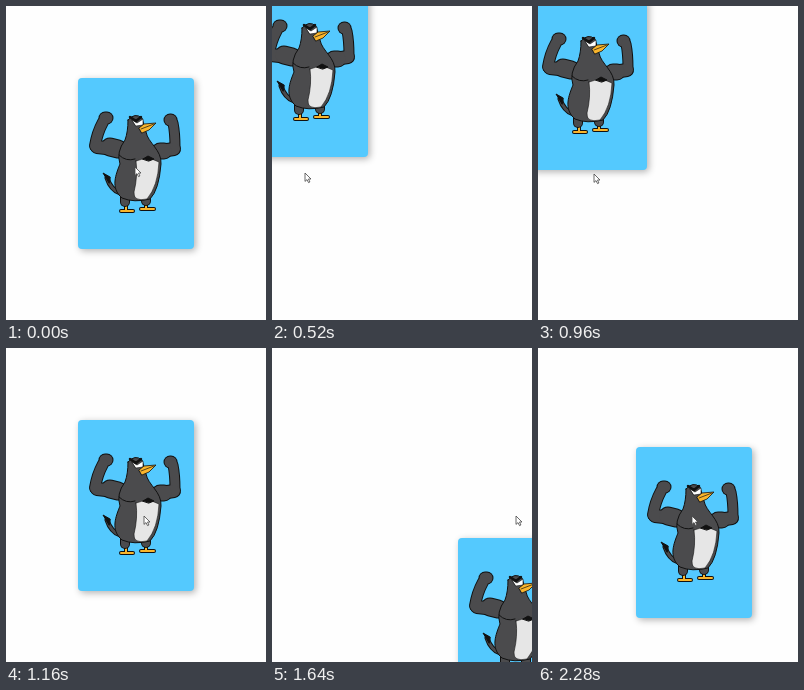
An HTML page with a canvas for the animation above (2.32 s loop, 260x314 px).

```html
<!DOCTYPE html>
<html lang="en">
<head>
<meta charset="utf-8">
<style>
  html, body { margin: 0; width: 100%; height: 100%; overflow: hidden; background: #fefefe; }
  canvas { display: block; }
</style>
</head>
<body>
<canvas width="260" height="314"></canvas>
<script>
const ctx = document.querySelector('canvas').getContext('2d');
const LOOP = 2320, STEP = 40;
const GREY = '#4b4b4d', GOLD = '#f9b52c', INK = '#111';

const smooth = u => u * u * (3 - 2 * u);
const speedUp = u => u ** 2.3;
const slowDown = u => 1 - speedUp(1 - u);

// The drag: end time, card offset reached, easing
const drag = [[690, -109, smooth], [1160, 0, speedUp], [1760, 117, slowDown], [LOOP, 25, smooth]];

function offset(t) {
  let from = 0, x = 0;
  for (const [end, to, ease] of drag) {
    if (t < end) return x + (to - x) * ease((t - from) / (end - from));
    from = end;
    x = to;
  }
  return x;
}

function line(d, width = 1, color = INK) {
  ctx.lineWidth = width;
  ctx.strokeStyle = color;
  ctx.stroke(new Path2D(d));
}

function shape(d, fill, width = 1, color = INK) {
  ctx.fillStyle = fill;
  ctx.fill(new Path2D(d));
  line(d, width, color);
}

// Thick strokes merged into one outlined form; parts are [path, width]
function limb(color, ...parts) {
  for (const [d, w] of parts) line(d, w + 1, INK);
  for (const [d, w] of parts) line(d, w - 1, color);
}

function bird() {
  ctx.lineCap = ctx.lineJoin = 'round';
  limb(GREY, ['M114 187Q105 184 101 172', 4]);
  shape('M103 177L97 167L104 171Z', INK);
  limb(GOLD, ['M120 198V205H115H127', 3], ['M140 198V203H135H148', 3]);
  limb(GREY, ['M119 190V196', 9], ['M140 189V195', 9]);
  limb(GREY, ['M99 112H101', 12], ['M97 116Q91 127 89 140', 11], ['M91 141L118 144', 13], ['M104 141L112 143', 18]);
  limb(GREY, ['M164 114H165', 12], ['M167 117Q169 127 169 141', 10], ['M168 143L148 146', 13], ['M154 145H158', 16]);
  shape('M122 114Q129 106 136 112L140 126C142 137 156 144 155 158Q153 184 144 193Q128 197 116 192C104 182 110 168 114 158Q110 146 119 134Q122 126 122 114Z', GREY);
  shape('M130 155Q142 150 153 156Q152 180 141 193Q127 196 128 186Q132 170 130 155Z', '#e6e6e6', .6);
  shape('M137 153L142 150L148 153L143 155Z', INK);
  line('M113 149Q120 156 129 153');
  shape('M126 114L131 117L137 113V119L130 120Z', '#fff', .6);
  line('M124 111L130 115L135 111', 2.5);
  shape('M133 122L138 118L150 117L143 124L136 127Z', GOLD, .8);
  line('M135 123L148 118', .7);
}

function card() {
  ctx.shadowColor = 'rgba(0, 0, 0, .3)';
  ctx.shadowBlur = 7;
  ctx.shadowOffsetX = ctx.shadowOffsetY = 2;
  ctx.fillStyle = '#54c9fe';
  ctx.beginPath();
  ctx.roundRect(72, 72, 116, 171, 4);
  ctx.fill();
  ctx.shadowColor = 'transparent';
  bird();
}

function place(x, y, paint) {
  ctx.save();
  ctx.translate(Math.round(x), Math.round(y));
  paint();
  ctx.restore();
}

const pointer = () => shape('M0 0V8.4L2 6.6L3.5 9.6L4.9 9L3.5 6H6Z', '#fff', .8, '#444');

let start;
function draw(now) {
  start ??= now;
  const t = Math.floor((now - start) % LOOP / STEP) * STEP;
  const x = offset(t);
  ctx.fillStyle = '#fefefe';
  ctx.fillRect(0, 0, 260, 314);
  place(x, Math.max(x, x * 1.035), card);
  // the pointer runs slightly ahead of the card
  place(129 + offset(t + 20), 168 - 7 * Math.exp(-t / 200), pointer);
  requestAnimationFrame(draw);
}
requestAnimationFrame(draw);
</script>
</body>
</html>
```
